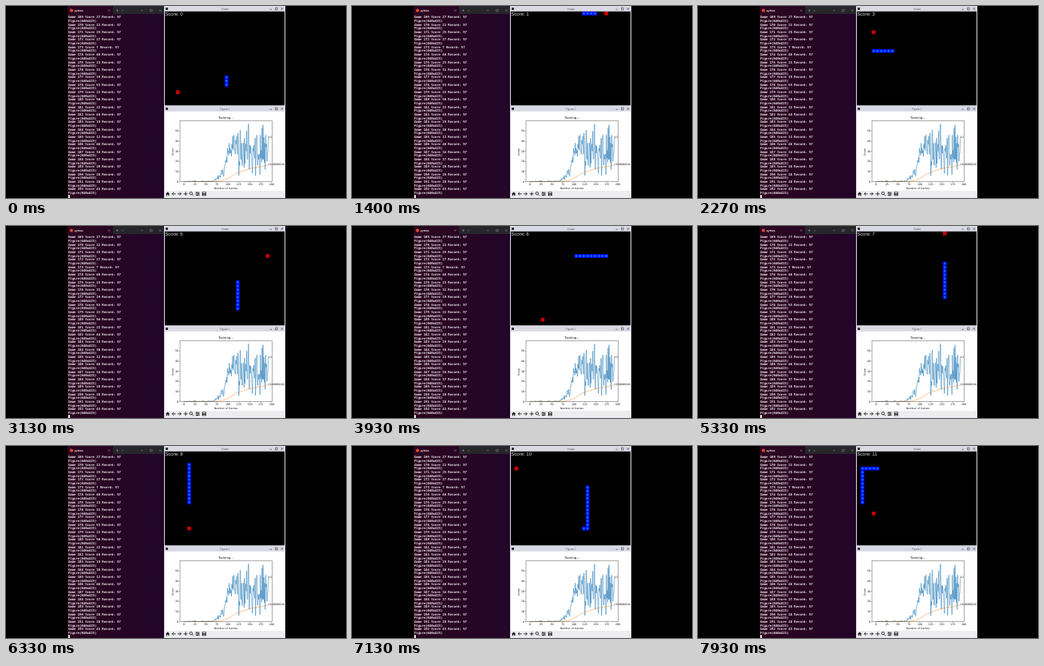
An HTML page for the animation above (8000 ms loop, 426 by 240 pixels).

```html
<!DOCTYPE html>
<html lang="en">
<head>
<meta charset="utf-8">
<title>Snake training</title>
<style>
  html, body { margin: 0; width: 100%; height: 100%; overflow: hidden; background: #000; }
  svg { display: block; width: 100vw; height: 100vh; }
  text { white-space: pre; text-rendering: geometricPrecision; }
  .mono { font: 3.92px "DejaVu Sans Mono", monospace; fill: #f2eef2; stroke: #f2eef2; stroke-width: .12; }
  .plot { font: 3.25px "DejaVu Sans", sans-serif; fill: #111; }
  .caption { font: 3.4px "Open Sans", sans-serif; fill: #444; text-anchor: middle; }
  .score { font: 6px "Liberation Sans", Arial, sans-serif; fill: #ddd; }
  .thin { fill: none; stroke-width: .5; }
</style>
</head>
<body>
<svg id="stage" viewBox="0 0 426 240">
  <defs>
    <linearGradient id="shell">
      <stop offset="0" stop-color="#2c061e"/>
      <stop offset="1" stop-color="#22052a"/>
    </linearGradient>
    <clipPath id="figureClip"><rect x="199" y="132" width="150" height="107"/></clipPath>
  </defs>
  <rect width="426" height="240"/>
  <g id="terminal"></g>
  <g id="game"></g>
  <g id="figure"></g>
</svg>
<script>
const $ = id => document.getElementById(id);

function add(parent, tag, attrs, content = '') {
  const node = document.createElementNS('http://www.w3.org/2000/svg', tag);
  for (const key in attrs) node.setAttribute(key, attrs[key]);
  node.textContent = content;
  parent.appendChild(node);
  return node;
}
const rect = (parent, x, y, width, height, fill) => add(parent, 'rect', { x, y, width, height, fill });
const line = (parent, d, stroke = '#111') => add(parent, 'path', { d, stroke, class: 'thin' });
const text = (parent, x, y, content, cls, extra = {}) => add(parent, 'text', { x, y, class: cls, ...extra }, content);

const recentScores = [27, 22, 25, 27, 7, 46, 23, 31, 19, 53, 22, 56,
                      22, 44, 19, 38, 12, 46, 34, 37, 20, 28, 28, 43];
const firstGame = 169;

function drawTerminal() {
  const g = $('terminal');
  rect(g, 77, 0, 121, 240, 'url(#shell)');
  rect(g, 134, 0, 64, 10, '#26262b');
  add(g, 'circle', { cx: 82, cy: 5.6, r: 2.1, fill: '#e2452f' });
  text(g, 86, 6.8, 'python', 'mono', { style: 'font-size:2.9px' });
  line(g, 'M128 4.4l2.4 2.4m0-2.4l-2.4 2.4M138 5.6h3m-1.5-1.5v3M145 5l1.2 1.2 1.2-1.2', '#999');
  line(g, 'M169 5.6h2.6M180.6 4.3h2.6v2.6h-2.6zM192 4.3l2.6 2.6m0-2.6l-2.6 2.6', '#999');
  const pitch = 4.675;
  recentScores.forEach((score, i) => {
    const y = 15.4 + i * 2 * pitch;
    text(g, 78, y, `Game ${firstGame + i} Score ${score} Record: 57`, 'mono');
    text(g, 78, y + pitch, 'Figure(640x423)', 'mono');
  });
  rect(g, 78, 236.2, 2, 3.8, '#f2eef2');
}

function drawWindow(g, top, bottom, caption, fill) {
  rect(g, 198, top, 152, bottom - top, '#d9d9e4');
  rect(g, 199, top + 6.8, 150, bottom - top - 7.6, fill);
  rect(g, 200, top + 2, 3, 3, '#333');
  text(g, 274.5, top + 4.9, caption, 'caption');
  const y = top + 2.2;
  line(g, `M330.5 ${y + 2}h2.6M337.5 ${y}h2.6v2.6h-2.6zM344.5 ${y}l2.6 2.6m0-2.6l-2.6 2.6`);
}

// Score history: flat start, then a noisy climb ending in the listed games.
function makeScores() {
  let seed = 29;
  const random = () => (seed = seed * 16807 % 2147483647) / 2147483647;
  return Array.from({ length: 193 }, (_, game) => {
    const noise = (random() + random()) / 2;
    if (game >= firstGame) return recentScores[game - firstGame];
    if (game < 68) return noise > .7 ? 1 : 0;
    const level = 34 * Math.min(1, (game - 62) / 47) ** 2.2;
    return Math.min(57, Math.round(1 + level * (.1 + 1.8 * noise)));
  });
}

function drawFigure() {
  const g = $('figure');
  drawWindow(g, 125, 240, 'Figure 1', '#fff');
  const px = game => 223 + game * .55;
  const py = score => 219.5 - score * 1.265;
  const curve = values => 'M' + values.map((v, i) => `${px(i).toFixed(2)} ${py(v).toFixed(2)}`).join('L');
  const scores = makeScores();
  let sum = 0;
  const means = scores.map((s, i) => (sum += s) / (i + 1));
  line(g, curve(scores), '#1f77b4');
  line(g, curve(means), '#ff7f0e');
  add(g, 'rect', { x: 218, y: 143.5, width: 115.3, height: 76, stroke: '#111', class: 'thin', style: 'stroke-width:.35' });

  for (let v = 0; v <= 200; v += 25) {
    line(g, `M${px(v)} 219.5v.9`);
    text(g, px(v), 224.3, v, 'plot', { 'text-anchor': 'middle' });
  }
  for (let v = 0; v <= 50; v += 10) {
    line(g, `M218 ${py(v)}h-.9`);
    text(g, 216.2, py(v) + 1.2, v, 'plot', { 'text-anchor': 'end' });
  }
  text(g, 275.5, 141.4, 'Training...', 'plot', { 'text-anchor': 'middle', style: 'font-size:3.9px' });
  text(g, 275.5, 228.7, 'Number of Games', 'plot', { 'text-anchor': 'middle' });
  text(g, 0, 0, 'Score', 'plot', { 'text-anchor': 'middle', transform: 'translate(210 182.5) rotate(-90)' });
  const labels = add(g, 'g', { 'clip-path': 'url(#figureClip)' });
  text(labels, 328.6, py(43), '43', 'plot');
  text(labels, 328.6, 198.8, '16.88860104', 'plot');

  rect(g, 199, 231, 150, 8.2, '#ededf0');
  add(g, 'path', { d: 'M200 235l2.6-2.6 2.6 2.6h-.8v2.2h-1.2v-1.6h-1.2v1.6h-1.2V235z', fill: '#111' });
  const icons = line(g, 'M212.6 234.8h-4.4m2-2l-2 2 2 2M215 234.8h4.4m-2-2l2 2-2 2' +
    'M222.6 234.8h5m-2.5-2.5v5M233 235.4l2 2M237.6 233.2h5m-5 1.7h5m-5 1.7h5M239 232.5v1.4m2 .3v1.4m-1.5 .3v1.4');
  icons.style.strokeWidth = .8;
  add(g, 'circle', { cx: 231.8, cy: 234.2, r: 1.7, fill: 'none', stroke: '#111', 'stroke-width': .8 });
  rect(g, 245.8, 232.4, 4.8, 4.8, '#111');
  rect(g, 246.8, 232.8, 2.8, 1.5, '#eee');
  rect(g, 247, 235.3, 2.4, 1.9, '#999');
}

// Corners of the head's route on the grid; a third value marks eaten food.
const corners = [
  [16, 17], [16, 21], [3, 21, 1], [3, 0], [25, 0, 1], [25, 10, 1], [4, 10], [4, 5, 1],
  [19, 5], [19, 20, 1], [27, 20], [27, 6, 1], [8, 6], [8, 23, 1], [23, 23], [23, 0, 1],
  [6, 0], [6, 20, 1], [20, 20], [20, 9, 1], [20, 4], [1, 4, 1], [1, 14]
];
// [tick, steps made by the head]
const pace = [[0, 0], [21, 55], [47, 124], [59, 156], [80, 212], [95, 250], [119, 315], [120, 316]];
const ticks = 120, tickMs = 200 / 3, cell = 150 / 32, startLength = 3;

const route = [corners[0]];
const meals = [];
corners.slice(1).forEach(([cx, cy, eaten]) => {
  let [x, y] = route[route.length - 1];
  while (x !== cx || y !== cy) {
    x += Math.sign(cx - x);
    y += Math.sign(cy - y);
    route.push([x, y]);
  }
  if (eaten) meals.push({ at: route.length - 1, spot: [cx, cy] });
});
meals.push({ at: Infinity, spot: [4, 16] });

const game = $('game');
drawTerminal();
drawWindow(game, 0, 125, 'Snake', '#000');
drawFigure();
const body = add(game, 'path', { fill: '#00f' });
const cores = add(game, 'path', { fill: '#0064ff' });
const food = add(game, 'path', { fill: '#c80000' });
const scoreText = text(game, 199.3, 12.3, '', 'score');

function square([col, row], inset = 0) {
  const size = cell * (1 - 2 * inset);
  return `M${199 + (col + inset) * cell} ${7 + (row + inset) * cell}h${size}v${size}h${-size}z`;
}

function stepsAt(tick) {
  const i = pace.findIndex(([t]) => t > tick);
  const [t0, s0] = pace[i - 1], [t1, s1] = pace[i];
  return Math.floor(s0 + (s1 - s0) * (tick - t0) / (t1 - t0) + 1e-6);
}

// Frame delays are whole hundredths of a second, so a tick may begin up to 10 ms early.
function render(now) {
  const tick = Math.floor((now + 10) / tickMs) % ticks;
  const head = startLength - 1 + stepsAt(tick);
  const score = meals.filter(m => m.at <= head).length;
  const cells = route.slice(head + 1 - startLength - score, head + 1);
  body.setAttribute('d', cells.map(c => square(c)).join(''));
  cores.setAttribute('d', cells.map(c => square(c, .2)).join(''));
  food.setAttribute('d', square(meals[score].spot));
  scoreText.textContent = `Score: ${score}`;
}

const start = performance.now();
function loop() {
  render(performance.now() - start);
  requestAnimationFrame(loop);
}
loop();
</script>
</body>
</html>
```
